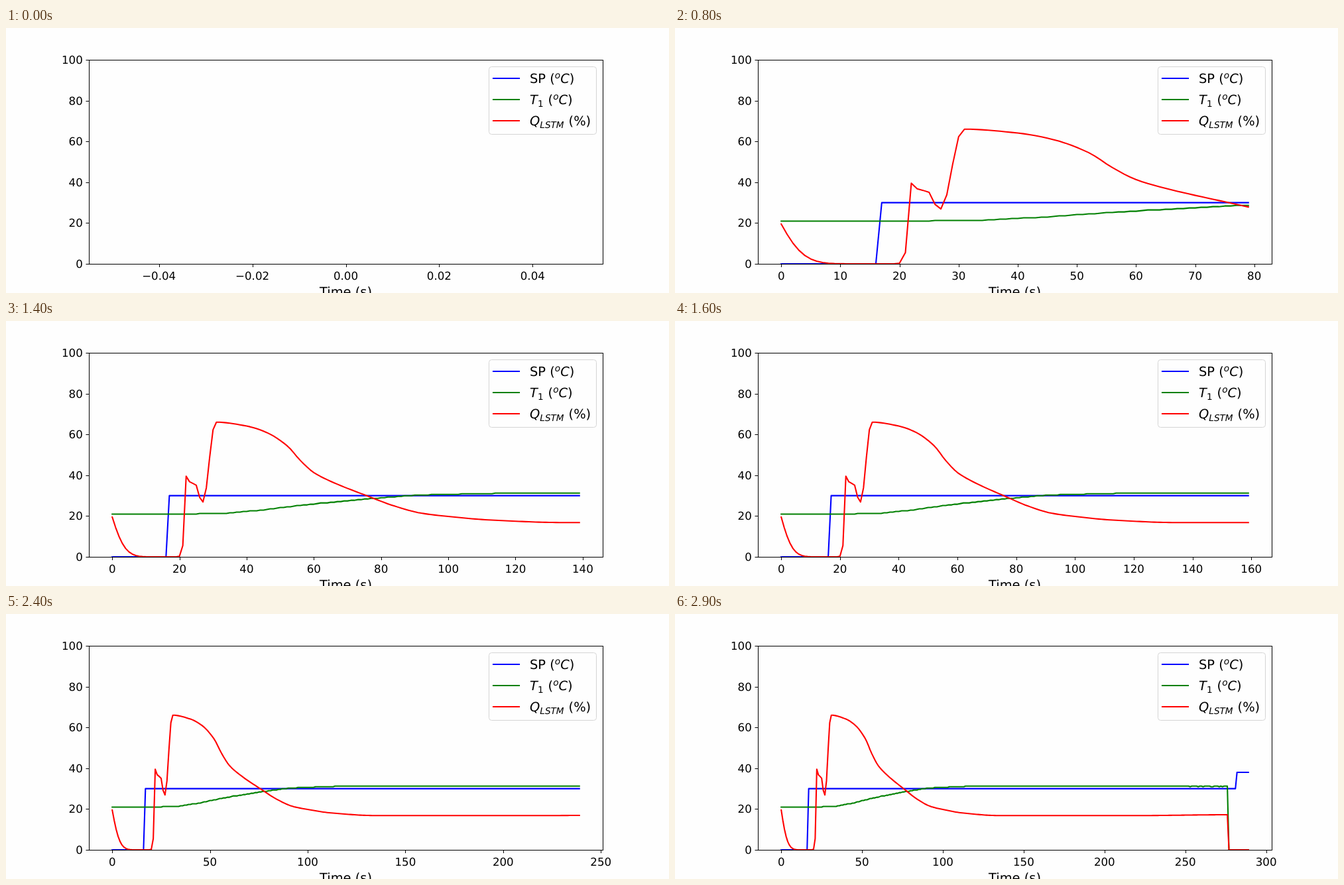
These frames come from a looping animation (1000x400 px, 3 s). An HTML page:

```html
<!DOCTYPE html>
<html lang="en">
<head>
<meta charset="utf-8">
<title>Temperature control</title>
<style>
  html, body { margin: 0; width: 100%; height: 100%; overflow: hidden; background: #fefefe; }
  svg { display: block; width: 1000px; height: 400px; font-family: "DejaVu Sans", sans-serif; }
  text { text-rendering: geometricPrecision; }
  .ticks { font-size: 16.67px; }
  .label { font-size: 19.44px; }
  .label .script { font-size: 13.61px; }
  .it { font-style: italic; }
  .axis { fill: none; stroke: #000; stroke-width: 1; }
  .line { fill: none; stroke-width: 2.083; stroke-linecap: square; stroke-linejoin: round; }
</style>
</head>
<body>
<svg viewBox="0 0 1000 400">
  <clipPath id="plot"><rect x="125" y="48" width="775" height="308"/></clipPath>
  <g id="lines" clip-path="url(#plot)"></g>
  <g id="yAxis" class="ticks" text-anchor="end"></g>
  <g id="xAxis" class="ticks" text-anchor="middle"></g>
  <rect class="axis" x="125.5" y="48.5" width="775" height="308"/>
  <text class="label" x="512.5" y="405" text-anchor="middle">Time (s)</text>
  <g id="legend"></g>
</svg>
<script>
const LEFT = 125, WIDTH = 775, BOTTOM = 356, HEIGHT = 308;
const LOOP = 3000, STEP = 100, SAMPLES = 10, TOTAL = 290;
const SPIKE = 20, DROP = 277;
const $ = id => document.getElementById(id);
const snap = v => Math.floor(v + 0.5) + 0.5;
const yPos = v => BOTTOM - HEIGHT * v / 100;

// Monotone cubic curve through key points
function curve(keys, x) {
  const last = keys.length - 1;
  const rate = j => (keys[j + 1][1] - keys[j][1]) / (keys[j + 1][0] - keys[j][0]);
  const slope = j => {
    if (j === 0 || j === last) return 0;
    const a = rate(j - 1), b = rate(j);
    return a * b > 0 ? 2 * a * b / (a + b) : 0;
  };
  let i = 0;
  while (i < last - 1 && keys[i + 1][0] <= x) i++;
  const [x0, y0] = keys[i], [x1, y1] = keys[i + 1];
  const h = x1 - x0, t = (x - x0) / h, u = 1 - t;
  return u * u * (1 + 2 * t) * y0 + t * t * (3 - 2 * t) * y1
    + h * t * u * (u * slope(i) - t * slope(i + 1));
}

// Repeatable noise in the range -0.2 to 0.2
function noise(x) {
  const v = Math.sin(x * 12.9898) * 43758.5453;
  return 0.4 * (v - Math.floor(v) - 0.5);
}

const setPoint = x => x < 17 ? 0 : x < 282 ? 30 : 38;

const heaterKeys = [[20, 0.3], [21, 5.5], [22, 39.5], [23, 36.8], [25, 35.1], [26, 29.2],
  [27, 26.9], [28, 33.8], [30, 62.3], [31, 66], [40, 64.1], [46, 60.9], [52, 54.5], [56, 47.2],
  [60, 41.3], [66, 36.3], [76, 29.8], [84, 24.9], [92, 21.4], [100, 19.8], [112, 18.1],
  [135, 16.8], [220, 16.8], [276, 17.2]];
function heater(x) {
  if (x >= DROP) return 0;
  return x < SPIKE ? 19.5 * Math.exp(-0.27 * x - 0.03 * x * x) : curve(heaterKeys, x);
}

// Sensor reading, counted in steps of its resolution
const sensorKeys = [[0, 0], [25, 0.3], [26, 0.7], [33, 1.2], [40, 4.4], [45, 6.3], [50, 9.6],
  [60, 15.4], [79, 24.4], [88, 28], [100, 30.2], [122, 31.8], [220, 31.8], [276, 31.55]];
const sensor = x => x < DROP ? 20.95 + 0.322 * Math.round(curve(sensorKeys, x) + noise(x)) : 0;

const script = (text, shift, italic) =>
  `<tspan class="script${italic ? " it" : ""}" dy="${shift}">${text}</tspan>`;
const celsius = `(${script("o", -7, true)}<tspan class="it" dy="7">C</tspan>)`;
const series = [
  { color: "#00f", value: setPoint, label: `SP ${celsius}` },
  { color: "#008000", value: sensor,
    label: `<tspan class="it">T</tspan>${script("1", 4)}<tspan dx="0.8" dy="-4"> </tspan>${celsius}` },
  { color: "#f00", value: heater,
    label: `<tspan class="it">Q</tspan>${script("LSTM", 4, true)}<tspan dx="0.8" dy="-4"> (%)</tspan>` }
];
for (const s of series) s.data = Array.from({ length: TOTAL }, (_, x) => s.value(x));

$("lines").innerHTML = series.map(s => `<path class="line" stroke="${s.color}"/>`).join("");
const paths = [...$("lines").children];

$("yAxis").innerHTML = [0, 20, 40, 60, 80, 100].map(v => {
  const y = snap(yPos(v));
  return `<path class="axis" d="M120.5 ${y}H125.5"/><text x="115.8" y="${y + 5.5}">${v}</text>`;
}).join("");

$("legend").innerHTML =
  `<rect x="728.5" y="58.5" width="162" height="102" rx="3.9" fill="#fff" stroke="#ccc" opacity="0.8"/>` +
  series.map((s, i) => {
    const y = 76 + 32 * i;
    return `<path class="line" stroke="${s.color}" d="M735 ${y}H774"/>` +
      `<text class="label" x="790" y="${y + 7}">${s.label}</text>`;
  }).join("");

// Picks the smallest round step that gives at most nine intervals
function drawTicks(lo, hi, xPos) {
  const raw = (hi - lo) / 9, exp = Math.floor(Math.log10(raw)), scale = 10 ** exp;
  const base = [1, 2, 2.5, 5, 10].find(b => b * scale >= raw), step = base * scale;
  const digits = Math.max(0, (base === 2.5 ? 1 : 0) - exp);
  let out = "";
  for (let i = Math.ceil(lo / step); i * step <= hi; i++) {
    const x = xPos(i * step);
    const text = (i < 0 ? "\u2212" : "") + Math.abs(i * step).toFixed(digits);
    out += `<path class="axis" d="M${snap(x)} 356.5V361"/><text x="${x.toFixed(2)}" y="380">${text}</text>`;
  }
  $("xAxis").innerHTML = out;
}

function draw(count) {
  const last = Math.max(0, count - 1), pad = last ? last * 0.05 : 0.055;
  const lo = -pad, hi = last + pad;
  const xPos = v => LEFT + WIDTH * (v - lo) / (hi - lo);
  drawTicks(lo, hi, xPos);
  series.forEach((s, i) => {
    const points = s.data.slice(0, count).map((v, x) => `${xPos(x).toFixed(2)} ${yPos(v).toFixed(2)}`);
    paths[i].setAttribute("d", points.length ? "M" + points.join("L") : "");
  });
}

let shown = -1;
function tick() {
  const count = Math.floor(performance.now() % LOOP / STEP) * SAMPLES;
  if (count !== shown) draw(shown = count);
  requestAnimationFrame(tick);
}
tick();
</script>
</body>
</html>
```
